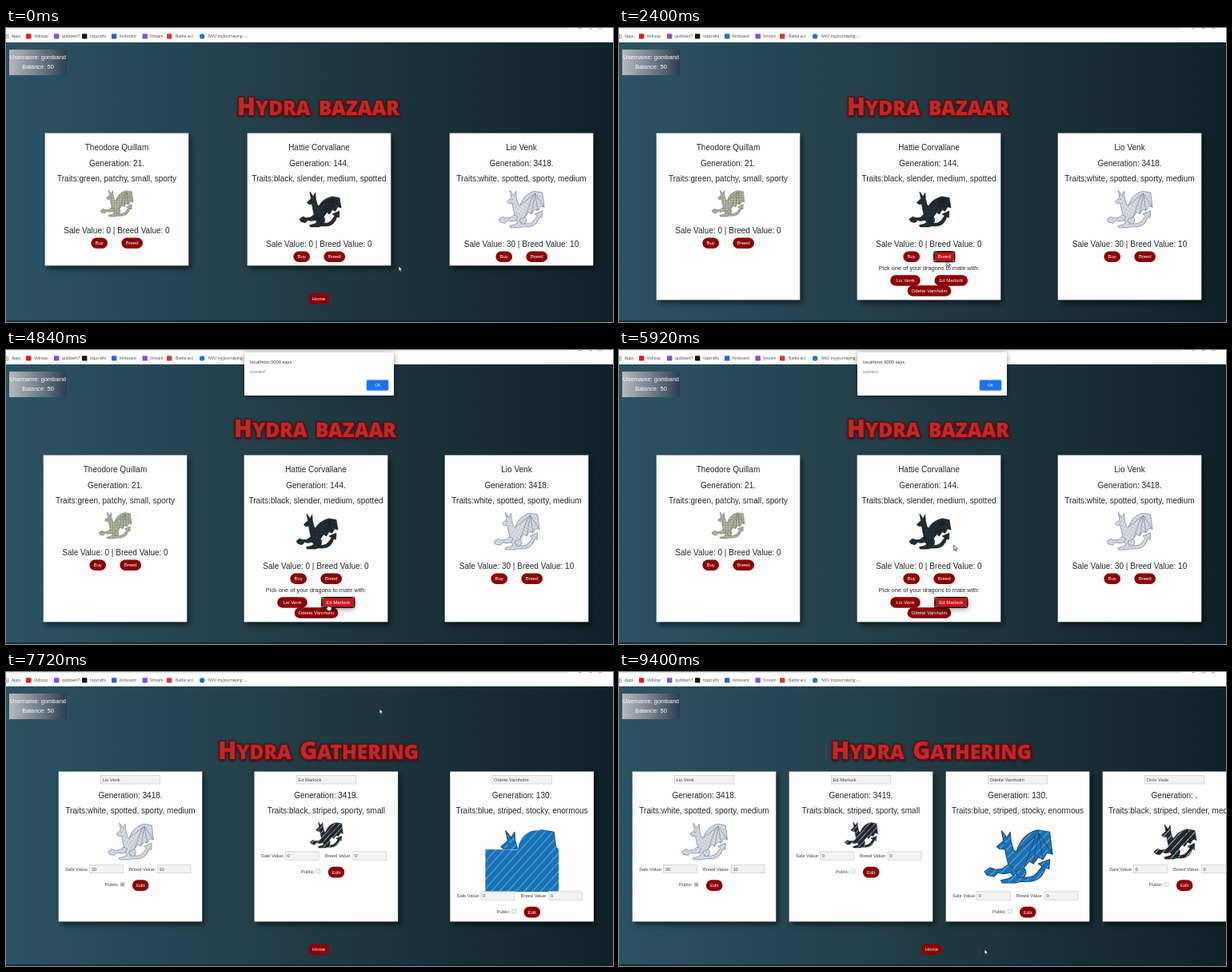
Recreate the animation shown at these times as an HTML page. Size 759 by 368 pixels, loop 10000 ms.

```html
<!DOCTYPE html>
<html lang="en">
<head>
<meta charset="utf-8">
<title>Hydra bazaar</title>
<style>
html, body { margin: 0; width: 100%; height: 100%; overflow: hidden; background: #203a43; }
svg { display: block; width: 759px; height: 368px; }
text { font-family: "Liberation Sans", Arial, sans-serif; fill: #272b2f; }
.mid { text-anchor: middle; }
.big { font-size: 10px; }
.small { font-size: 5.8px; fill: #444; }
.hint { font-size: 7.4px; }
.user { font-size: 7.5px; fill: #fff; }
.btn { font-size: 6px; fill: #fff; }
.tab { font: 4.9px "Open Sans", sans-serif; fill: #3c4043; }
.says { font: 5.8px "Open Sans", sans-serif; fill: #202124; }
.note { font: 5px "Open Sans", sans-serif; fill: #5f6368; }
.title {
  font: 800 24.5px "Open Sans", "Noto Sans", sans-serif; text-transform: uppercase; word-spacing: 4px;
  fill: #bf2926; stroke: #5e0f12; stroke-width: 2.8px; stroke-linejoin: round; paint-order: stroke;
  filter: drop-shadow(0 1px 1.5px #3a0a0d);
}
.cap { font-size: 30px; }
.card { fill: #fefefe; filter: drop-shadow(3px 4px 3px rgba(0, 0, 0, .55)); }
.field { fill: #f3f3f3; stroke: #c6c6c6; stroke-width: .6px; }
.lift { filter: drop-shadow(1px 2px 3px rgba(0, 0, 0, .4)); }
.box { filter: drop-shadow(0 1px 3px rgba(0, 0, 0, .45)); }

.step { animation: 10s step-end infinite; }
.market { animation-name: market; }
.press { animation-name: press; }
.mating { animation-name: mating; }
.breed { animation-name: breed; }
.mate { animation-name: mate; }
.chosen { animation-name: chosen; }
.alert { animation-name: alert; }
.ok { animation-name: ok; }
.loading { animation-name: loading; }
.loaded { animation-name: loaded; }
.arrow { animation-name: arrow; }
.hand { animation-name: hand; }
.cursor { animation: move 10s linear infinite; }

@keyframes market { 0% { opacity: 1 } 18.8%, 100% { opacity: 0 } }
@keyframes press { 0% { opacity: 0 } 9.2%, 100% { opacity: 1 } }
@keyframes mating { 0% { opacity: 0 } 18.8% { opacity: 1 } 75.6%, 100% { opacity: 0 } }
@keyframes breed { 0% { opacity: 1 } 41.2%, 100% { opacity: 0 } }
@keyframes mate { 0% { opacity: 0 } 30.4%, 100% { opacity: 1 } }
@keyframes chosen { 0% { opacity: 0 } 41.2%, 100% { opacity: 1 } }
@keyframes alert { 0% { opacity: 0 } 44% { opacity: 1 } 73.2%, 100% { opacity: 0 } }
@keyframes ok { 0% { opacity: 0 } 64%, 100% { opacity: 1 } }
@keyframes loading { 0% { opacity: 0 } 75.6% { opacity: 1 } 78.4%, 100% { opacity: 0 } }
@keyframes loaded { 0% { opacity: 0 } 78.4%, 100% { opacity: 1 } }
@keyframes arrow { 0% { opacity: 1 } 9.2% { opacity: 0 } 23.6% { opacity: 1 } 29.2% { opacity: 0 } 56.4%, 100% { opacity: 1 } }
@keyframes hand { 0% { opacity: 0 } 9.2% { opacity: 1 } 23.6% { opacity: 0 } 29.2% { opacity: 1 } 56.4%, 100% { opacity: 0 } }
@keyframes move {
  0%, .4% { transform: translate(491px, 298px); animation-timing-function: ease-in-out }
  10%, 21.2% { transform: translate(411px, 287px); animation-timing-function: ease-in-out }
  31.2% { transform: translate(403px, 317px) }
  34%, 56% { transform: translate(402.5px, 318px); animation-timing-function: ease-in-out }
  65%, 66% { transform: translate(463px, 40px) }
  66.8%, 73% { transform: translate(467px, 42px) }
  74.5%, 79.6% { transform: translate(467px, 46px) }
  82%, 83.6% { transform: translate(461px, 108px); animation-timing-function: ease-in }
  88.6% { transform: translate(445px, 215px); animation-timing-function: ease-out }
  93.6% { transform: translate(457px, 346px) }
  94%, 100% { transform: translate(457px, 347px) }
}
</style>
</head>
<body>
<svg id="stage" viewBox="0 0 759 368"></svg>
<script>
const text = (x, y, s, cls) => `<text x="${x}" y="${y}" class="${cls}">${s}</text>`;
const rect = (x, y, w, h, attrs) => `<rect x="${x}" y="${y}" width="${w}" height="${h}" ${attrs}/>`;
const step = (name, body) => `<g class="step ${name}">${body}</g>`;
const title = (x, s) => text(x, 109, s.replace(/[A-Z]/g, c => `<tspan class="cap">${c}</tspan>`), 'title mid');

const pill = (x, y, w, s, fill = '#8b0000', extra = '') =>
  rect(x - w / 2 - .3, y - 6.8, w + .6, 13.6, `rx="6.8" fill="${fill}" ${extra}`) + text(x, y + 2.1, s, 'btn mid');
const ring = (x, y, w) => rect(x - w / 2, y - 6.3, w, 12.6, 'rx="2" fill="none" stroke="#111" stroke-width="1.3"');
const panel = (c, top, bottom) => rect(c - 89.8, top - .4, 179.6, bottom - top + .8, 'class="card"');

// Dragon drawn in a 100 x 84 box; top sets the height of the wing.
const outline = top => `M18 27L28 18 25 2 33 13 38 4 39 18 43 33 47 35Q55 ${top + 6} 78 ${top}
  L96 ${top + 3} 100 39 92 37 86 47 79 44 72 54 66 50 58 60Q64 68 58 75Q72 77 79 66L85 58 79 54 96 47 95 62 90 60
  Q84 82 64 82L52 82 46 84 26 84 24 80 36 77 42 73 38 68 28 70 20 68 14 74 4 72 0 66 8 60 16 63 26 62
  35 55 32 42 30 31 22 31Z`;
const ribs = top => `M47 35L80 ${top + 5} 100 39M80 ${top + 5}L86 47M80 ${top + 5}L72 54M76 ${top + 7}L58 60
  M35 55L42 60 38 68M58 60L46 66 50 76 58 75M27 23L31 22`;
const dragon = (c, y, w, h, skin, line, top = 4) =>
  `<g transform="translate(${c - w / 2} ${y}) scale(${w / 100} ${h / 84})" stroke="${line}" stroke-width="1.3" stroke-linejoin="round">
  <path d="${outline(top)}" fill="url(#${skin})"/><path d="${ribs(top)}" fill="none"/></g>`;

const pattern = (id, size, base, marks, angle = 0) =>
  `<pattern id="${id}" width="${size}" height="${size}" patternUnits="userSpaceOnUse" patternTransform="rotate(${angle})">
  ${rect(0, 0, size, size, `fill="${base}"`)}${marks}</pattern>`;
const gradient = (id, units, stops) => `<linearGradient id="${id}" ${units}>` +
  stops.map((c, i) => `<stop offset="${i / (stops.length - 1)}" stop-color="${c}"/>`).join('') + '</linearGradient>';

const defs = '<defs>' +
  gradient('sky', 'gradientUnits="userSpaceOnUse" x1="0" x2="782"', ['#2c5364', '#203a43', '#0f2027']) +
  gradient('badge', '', ['#b6b8c0', '#74808b', '#2c3e50']) +
  pattern('plaid', 16, '#bcc5b3', rect(0, 0, 5, 16, 'fill="#7fa39c" opacity=".7"') +
    rect(0, 0, 16, 5, 'fill="#93a98c" opacity=".7"') + rect(10, 0, 1.5, 16, 'fill="#9a7448"') + rect(0, 10, 16, 1.5, 'fill="#9a7448"')) +
  pattern('coal', 9, '#202b32', '<circle cx="4" cy="4" r="1.3" fill="#35444d"/>') +
  pattern('snow', 7, '#d5dbe4', '<circle cx="3" cy="3" r="1.2" fill="#98a2b4"/>', 30) +
  pattern('ash', 12, '#1f2a30', rect(0, 0, 1.8, 12, 'fill="#c3cace"'), 42) +
  pattern('blue', 9, '#0f74c2', rect(0, 0, 1.6, 9, 'fill="#8296a0"'), 42) +
  '<clipPath id="arrived"><rect x="555" y="190" width="180" height="32"/></clipPath></defs>';

const tabs = [
  [25, 35, '#e02020', 'Vidloop'], [60, 70, '#8a4be0', 'quibbert7'], [95, 105, '#151515', 'topcrafts'],
  [132, 142, '#2f66c4', 'Kinboard'], [170.5, 180, '#8a4be0', 'Stroam'], [201, 212, '#d83a30', 'Battle acc'],
  [242, 253, '#1f78c8', 'NVU myJourneying -...']
];
const browser = rect(0, 0, 759, 18, 'fill="#fff"') + rect(-9, -8, 714, 9.6, 'rx="4" fill="#e6e8eb"') +
  [716, 729, 741].map(x => rect(x, 0, 4, 1.2, 'fill="#b5b9be"')).join('') +
  [8, 10, 12].map((y, i) => rect(0, y, 1.3, 1.3, `fill="${['#d9534a', '#4a86d9', '#4fa564'][i]}"`) +
    rect(2, y, 1.3, 1.3, 'fill="#8a8f96"')).join('') +
  text(7, 12.2, 'Apps', 'tab') +
  tabs.map(([x, tx, color, s]) => rect(x, 7.2, 6.4, 6.4, `rx="${x > 240 ? 3.2 : .8}" fill="${color}"`) + text(tx, 12.2, s, 'tab')).join('');

const page = rect(0, 0, 759, 368, 'fill="url(#sky)"') + rect(0, 366, 759, 2, 'fill="#121d2c" opacity=".7"') +
  rect(4, 27, 72, 32, 'fill="url(#badge)"') +
  text(40, 39.2, 'Username: gomband', 'user mid') + text(40, 51.2, 'Balance: 50', 'user mid');

const shop = [
  { name: 'Theodore Quillam', gen: 21, traits: 'green, patchy, small, sporty', sale: 0, fee: 0, row: 253,
    art: c => dragon(c, 202, 41, 34, 'plaid', '#6d7368') },
  { name: 'Hattie Corvallane', gen: 144, traits: 'black, slender, medium, spotted', sale: 0, fee: 0, row: 270,
    art: c => dragon(c + 1.5, 204, 52, 45, 'coal', '#10171b', 13) },
  { name: 'Lio Venk', gen: 3418, traits: 'white, spotted, sporty, medium', sale: 30, fee: 10, row: 270,
    art: c => dragon(c, 202, 57, 48, 'snow', '#7d8591') }
];
const shopCard = (d, c, bottom) =>
  panel(c, 132, bottom) +
  text(c, 153.4, d.name, 'big mid') + text(c, 172.5, `Generation: ${d.gen}.`, 'big mid') +
  text(c, 191.7, `Traits:${d.traits}`, 'big mid') + d.art(c) +
  text(c, d.row + 3.6, `Sale Value: ${d.sale} | Breed Value: ${d.fee}`, 'big mid') +
  pill(c - 21.8, d.row + 16.3, 20, 'Buy') + pill(c + 19.2, d.row + 16.3, 26, 'Breed');
const shopPage = (mid, gap, bottom) => title(mid - 1, 'Hydra bazaar') +
  shop.map((d, i) => shopCard(d, mid + (i - 1) * gap, bottom)).join('');

const market = shopPage(391.5, 253, 297) + pill(391, 339, 26, 'Home') +
  step('press', `<g class="lift">${pill(410.5, 286.3, 26, 'Breed', '#ab1c28', 'stroke="#c9b6bf" stroke-width="1.2"')}</g>`);

const mating = shopPage(387.5, 251, 340) +
  text(387.7, 303.2, 'Pick one of your dragons to mate with:', 'hint mid') +
  pill(358, 316, 37, 'Lio Venk') + pill(415.3, 316, 41, 'Ed Marlock') + pill(388, 329, 54, 'Odette Varnholm') +
  step('breed', pill(406.8, 286.3, 26, 'Breed', '#bd1418') + ring(406.8, 286.3, 26)) +
  step('mate', `<g class="lift">${pill(415.3, 316, 41, 'Ed Marlock', '#c0171b')}</g>`) +
  step('chosen', ring(415.3, 316, 41));

const owned = [
  { name: 'Lio Venk', gen: 3418, traits: 'white, spotted, sporty, medium', sale: 30, fee: 10, row: 246.5, open: true,
    art: c => dragon(c + .5, 188, 57, 47, 'snow', '#7d8591') },
  { name: 'Ed Marlock', gen: 3419, traits: 'black, striped, sporty, small', sale: 0, fee: 0, row: 230,
    art: c => dragon(c + .5, 187, 41, 33, 'ash', '#10171b') },
  { name: 'Odette Varnholm', gen: 130, traits: 'blue, striped, stocky, enormous', sale: 0, fee: 0, row: 280,
    art: c => dragon(c + 1, 197, 85, 67, 'blue', '#1d4a70', 1) },
  { name: 'Orrin Vade', gen: '', traits: 'black, striped, slender, medium', sale: 0, fee: 0, row: 246.5,
    art: c => dragon(c + 1, 190, 53, 44, 'ash', '#10171b', 13) }
];
const field = (x, y, w, s) => rect(x, y - 5.2, w, 10.4, 'class="field"') + text(x + 2.2, y + 2.1, s, 'small');
const ownedCard = (d, c, art = d.art) => {
  const y = d.row, p = y + 20.2;
  return panel(c, 125, 312) + field(c - 37.2, 134.8, 74.5, d.name) +
    text(c, 157.6, `Generation: ${d.gen}.`, 'big mid') + text(c, 176.7, `Traits:${d.traits}`, 'big mid') + art(c) +
    text(c - 81.5, y + 2, 'Sale Value:', 'small') + field(c - 51, y, 41.8, d.sale) +
    text(c - 1.5, y + 2, 'Breed Value:', 'small') + field(c + 33.7, y, 41.8, d.fee) +
    text(c - 31.5, p + 1.6, 'Public:', 'small') +
    rect(c - 12.4, p - 3.2, 5, 5, `rx=".8" fill="${d.open ? '#c9c9c9' : '#f6f6f6'}" stroke="#bbb" stroke-width=".6"`) +
    (d.open ? `<path d="M${c - 11.3} ${p - .8}l1.2 1.3 2-2.6" fill="none" stroke="#666" stroke-width=".8"/>` : '') +
    pill(c + 12.7, p + .4, 20, 'Edit');
};
// Picture still arriving: only the upper part has its final shape.
const partial = c => `<g clip-path="url(#arrived)">${owned[2].art(c)}</g>
  <path transform="translate(${c - 41.5} 197) scale(.85)" fill="url(#blue)" d="M43 30Q46 1 76 1Q102 4 96 22L103 29.4V92H-5V29.4Z"/>`;
const collection = cards => title(390.5, 'Hydra Gathering') + pill(391, 347, 26, 'Home') + cards.join('');
const loading = collection([0, 1, 2].map(i => ownedCard(owned[i], 155.5 + i * 244.8, i === 2 ? partial : undefined)));
const loaded = collection(owned.map((d, i) => ownedCard(d, 106.5 + i * 196)));

const okButton = fill => rect(451, 37.5, 27, 13.3, `rx="1.6" fill="${fill}"`) +
  '<text x="464.5" y="46" class="note mid" style="fill:#fff">OK</text>';
const dialog = rect(298, 3, 187, 54, 'rx="1.5" fill="#fff" class="box"') +
  text(305, 17, 'localhost:3000 says', 'says') + text(305, 28.6, 'success!', 'note') +
  okButton('#1a73e8') + rect(450.6, 37.1, 27.8, 14.1, 'rx="2" fill="none" stroke="#a9cbf7" stroke-width=".8"') +
  step('ok', okButton('#3d88de'));

const cursor = `<g class="cursor" stroke="#111" stroke-width=".7" fill="#fff" stroke-linejoin="round">
  <path class="step arrow" d="M0 0V6.4L1.5 5 2.5 7.4 3.7 6.9 2.7 4.7H4.7Z"/>
  <path class="step hand" d="M-.7 .6Q0-.5 .7 .6V3L4 3.6Q4.7 4 4.5 5.5L3.8 8.4H0L-2.3 5.4Q-2.4 4.3-1.4 4.6L-.7 5.2Z"/></g>`;

document.getElementById('stage').innerHTML = defs + page +
  step('market', market) + step('mating', mating) + step('loading', loading) + step('loaded', loaded) +
  browser + step('alert', dialog) + cursor;
</script>
</body>
</html>
```
